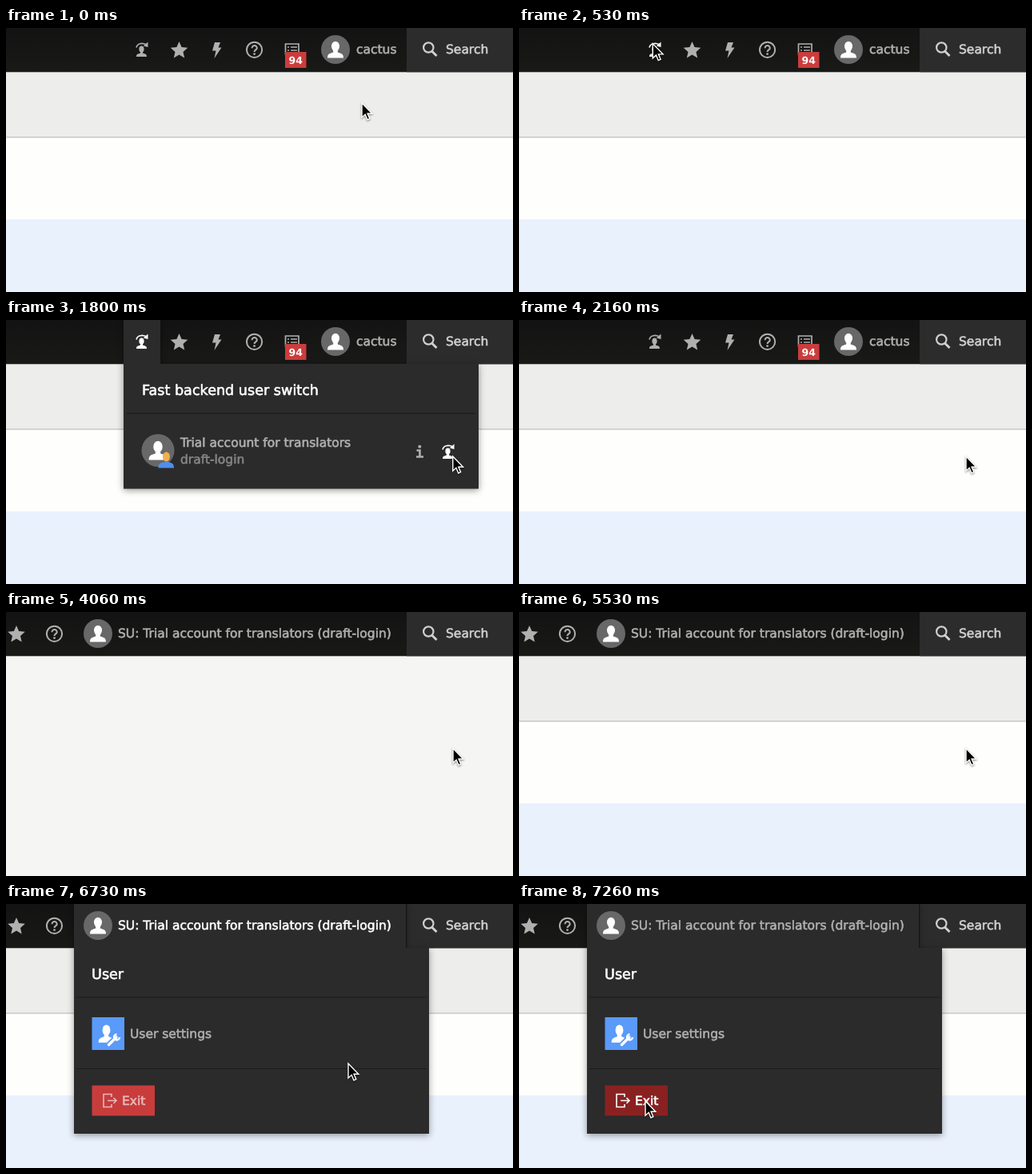
An HTML page for the animation above (7.3 s loop, 634x331 px).

```html
<!DOCTYPE html>
<html lang="en">
<head>
<meta charset="utf-8">
<title>User switch</title>
<style>
  html, body { margin: 0; height: 100%; overflow: hidden; background: #fefefd; }
  svg { display: block; }
  text {
    font: 15.5px "DejaVu Sans", sans-serif;
    text-rendering: geometricPrecision;
    fill: currentColor; stroke: currentColor; stroke-width: .6px;
  }
  .title { font-size: 17.6px; color: #fff; }
  .badge { font-size: 12.5px; font-weight: bold; stroke: none; }
  .bar { color: #b0b0b0; }
  .menu { filter: drop-shadow(0 2px 4px #0006); }
  .line { fill: none; stroke: currentColor; }
</style>
</head>
<body>
<svg width="634" height="331" viewBox="0 0 634 331" stroke-width="2">
  <defs>
    <linearGradient id="top" x2="0" y2="1">
      <stop stop-color="#131313"/><stop offset="1" stop-color="#191918"/>
    </linearGradient>
    <linearGradient id="glow" x2="0" y2="1">
      <stop offset=".5" stop-color="#ff8700"/><stop offset=".5" stop-color="#ff8700" stop-opacity=".35"/>
      <stop offset="1" stop-color="#ff8700" stop-opacity="0"/>
    </linearGradient>
    <g id="bust" fill="currentColor">
      <ellipse cy="-4" rx="5" ry="6.3"/>
      <path d="M-2.8 0H2.8V3.5C7 5 10 5 10 10.5H-10C-10 5-7 5-2.8 3.5Z"/>
    </g>
    <g id="avatar">
      <circle r="18" fill="#686868"/>
      <use href="#bust" color="#fff"/>
    </g>
    <g id="switch" fill="currentColor">
      <ellipse cx="-.5" cy="-.5" rx="3.1" ry="4"/>
      <path d="M-2 2H1V4.500C4 5.500 6 5.500 6 9H-7C-7 5.500-5 5.500-2 4.500ZM7.500-9.500V-3L1.800-4.500Z"/>
      <path d="M-7-2.500C-6-7.500 0-9 5.500-6.200" class="line" stroke-width="1.6"/>
    </g>
    <path id="star" fill="currentColor"
      d="M0-11 3.1-3.9 10.8-3.2 5 2 6.7 9.6 0 5.6-6.7 9.6-5 2-10.8-3.2-3.1-3.9Z"/>
    <g id="help">
      <circle r="9.6" class="line"/>
      <path d="M-3-2C-3-6.5 3.4-6 3.2-2C3 .2 0 0 0 2.6" class="line"/>
      <circle cy="5.3" r="1.4" fill="currentColor"/>
    </g>
  </defs>

  <g id="page">
    <rect y="55" width="634" height="82" fill="#ededec"/>
    <rect y="136" width="634" height="1.8" fill="#cfcfcf"/>
    <rect y="240" width="634" height="91" fill="#e9f1fc"/>
  </g>
  <rect id="blank" y="55" width="634" height="276" fill="#f5f5f4"/>
  <rect id="progress" y="55" height="6" fill="url(#glow)"/>

  <rect width="634" height="55.3" fill="url(#top)"/>
  <rect x="501" width="133" height="55.3" fill="#2c2c2c"/>
  <g color="#d0d0d0">
    <circle cx="528.3" cy="24.5" r="6.2" class="line" stroke-width="2.2"/>
    <path d="M532.5 29 538.5 35" class="line" stroke-width="3"/>
    <text x="550" y="32">Search</text>
  </g>

  <g id="switchMenu">
    <g class="menu" fill="#2b2b2c">
      <rect x="147" y="55" width="444" height="156.6"/>
      <rect x="147" width="46" height="56"/>
    </g>
    <rect x="151" y="116.5" width="436" height="1.2" fill="#1b1b1b"/>
    <text class="title" x="170" y="94">Fast backend user switch</text>
    <use href="#avatar" transform="translate(190 163.5) scale(1.14)"/>
    <path d="M190.500 185.500C190.500 179 194 179 200.500 177.500C207 179 210 179 210 185.500Z" fill="#4f8fe8"/>
    <ellipse cx="200.500" cy="171.500" rx="4.500" ry="6" fill="#f0b04c"/>
    <text id="rowTitle" x="218" y="158.500">Trial account for translators</text>
    <text x="218" y="180" color="#858585">draft-login</text>
    <path d="M513.500 163.500H517.500V171M513 171.500H522" class="line" color="#b0b0b0" stroke-width="2.6"/>
    <circle cx="517.300" cy="158.800" r="2" fill="#b0b0b0"/>
    <use id="rowSwitch" href="#switch" x="553" y="165"/>
  </g>

  <g id="adminBar" class="bar">
    <use id="barSwitch" href="#switch" x="170" y="27"/>
    <use href="#star" x="216.5" y="28"/>
    <path d="M261 18H268L265.500 24.500H269.500L260.500 38 262.500 28.500H258Z" fill="currentColor"/>
    <use href="#help" x="310.6" y="27.3"/>
    <path d="M349.500 20H366V33H349.500ZM352 24H354M356 24H364M352 28H354M356 28H364"
      class="line" stroke-width="1.7"/>
    <rect x="349" y="30" width="26.500" height="20" fill="#cb3d3d"/>
    <text class="badge" x="362.300" y="45" text-anchor="middle" color="#fff">94</text>
    <use href="#avatar" x="412" y="27"/>
    <text x="438" y="32">cactus</text>
  </g>

  <g id="userMenu">
    <g class="menu" fill="#2b2b2c">
      <rect x="85" y="55" width="444" height="233"/>
      <rect x="85" width="415" height="56"/>
    </g>
    <rect x="500" width="1.2" height="55" fill="#161616"/>
    <path d="M88 117H526M88 206.500H526" stroke="#1b1b1b" stroke-width="1.2"/>
    <text class="title" x="107" y="94">User</text>
    <rect x="107.5" y="142" width="40.5" height="41" fill="#5a9af8"/>
    <use href="#bust" transform="translate(125.5 162.500) scale(.98 1.08)" color="#fff"/>
    <path d="M129 176 138 167" stroke="#5a9af8" stroke-width="7"/>
    <path d="M128.500 176.500 138 167" stroke="#fff" stroke-width="3.4" stroke-linecap="round"/>
    <path d="M138.500 163.500A3.500 3.500 0 1 0 142 167" fill="none" stroke="#fff" stroke-width="2.4"/>
    <text x="155" y="167.500" color="#b0b0b0">User settings</text>
    <rect id="exitBox" x="107.500" y="227.500" width="78.500" height="38"/>
    <g id="exit">
      <path d="M132 242V238.500H122V254.500H132V251M127 246.500H138M134.500 243 138 246.500 134.500 250"
        class="line" stroke-width="1.6"/>
      <text x="145" y="251.500">Exit</text>
    </g>
  </g>

  <g id="userBar" class="bar">
    <use href="#star" x="13" y="28"/>
    <use href="#help" x="60.500" y="27.300"/>
    <use href="#avatar" x="115" y="27"/>
    <text id="label" x="140" y="32">SU: Trial account for translators (draft-login)</text>
  </g>

  <path id="cursor" d="M0 0V17L3.900 13.400 6.500 19.600 9.200 18.400 6.600 12.400H12Z"
    fill="#000" stroke="#fff" stroke-width="1.3" style="filter:drop-shadow(0 1.5px 1px #0007)"/>
</svg>

<script>
const LOOP = 7300;
const $ = id => document.getElementById(id);
const ramp = (t, from, to) => Math.min(1, Math.max(0, (t - from) / (to - from)));
const pulse = (t, a, b, c, d) => ramp(t, a, b) - ramp(t, c, d);
const mix = (a, b, k) => `rgb(${a.map((v, i) => Math.round(v + (b[i] - v) * k))})`;
const tone = k => mix([176, 176, 176], [255, 255, 255], k);
const show = (id, opacity) => {
  $(id).style.display = opacity > 0 ? '' : 'none';
  $(id).style.opacity = opacity;
};

const speedUp = k => k ** 1.6;
const slowDown = k => 1 - (1 - k) ** 2.2;
const smooth = k => k * k * (3 - 2 * k);

// Cursor stops: arrival time, x, y, easing of the way there
const stops = [
  [0, 445, 94],
  [10, 445, 94, smooth],
  [560, 165, 19, smooth],
  [1180, 165, 19, smooth],
  [1360, 449, 162, speedUp],
  [1830, 559, 171, slowDown],
  [5770, 559, 171, smooth],
  [6100, 440, 25, smooth],
  [6350, 440, 25, smooth],
  [6730, 428, 200, smooth],
  [7060, 192, 242, smooth],
  [7250, 158, 247, slowDown],
  [LOOP, 158, 247, smooth],
];

function cursorAt(t) {
  const i = stops.findIndex(stop => stop[0] > t);
  const [t0, x0, y0] = stops[i - 1], [t1, x1, y1, ease] = stops[i];
  const k = ease(ramp(t, t0, t1));
  return [x0 + (x1 - x0) * k, y0 + (y1 - y0) * k];
}

function draw(t) {
  const switched = t >= 4060;
  show('adminBar', +!switched);
  show('userBar', +switched);
  show('blank', +(switched && t < 4960));

  const closing = t < 2060 ? 1 : t < 2160 ? .5 : 0;
  show('switchMenu', ramp(t, 560, 650) * closing);
  $('barSwitch').style.color = tone(pulse(t, 400, 520, 2060, 2160));
  $('rowTitle').style.color = tone(pulse(t, 1290, 1350, 1440, 1600));
  $('rowSwitch').style.color = tone(ramp(t, 1560, 1740));

  $('progress').setAttribute('width', 634 * ramp(t, 5110, 5260));
  show('progress', t < 5120 ? 0 : 1 - ramp(t, 5340, 5530));

  show('userMenu', ramp(t, 6340, 6400));
  $('label').style.color = tone(pulse(t, 5940, 6100, 7090, 7260));
  const hover = ramp(t, 7090, 7250);
  $('exitBox').style.fill = mix([200, 60, 60], [138, 33, 33], hover);
  $('exit').style.color = mix([232, 184, 184], [255, 255, 255], hover);

  $('cursor').setAttribute('transform', `translate(${cursorAt(t)}) scale(1.07)`);
}

const start = performance.now();
function tick() {
  draw((performance.now() - start) % LOOP);
  requestAnimationFrame(tick);
}
tick();
</script>
</body>
</html>
```
